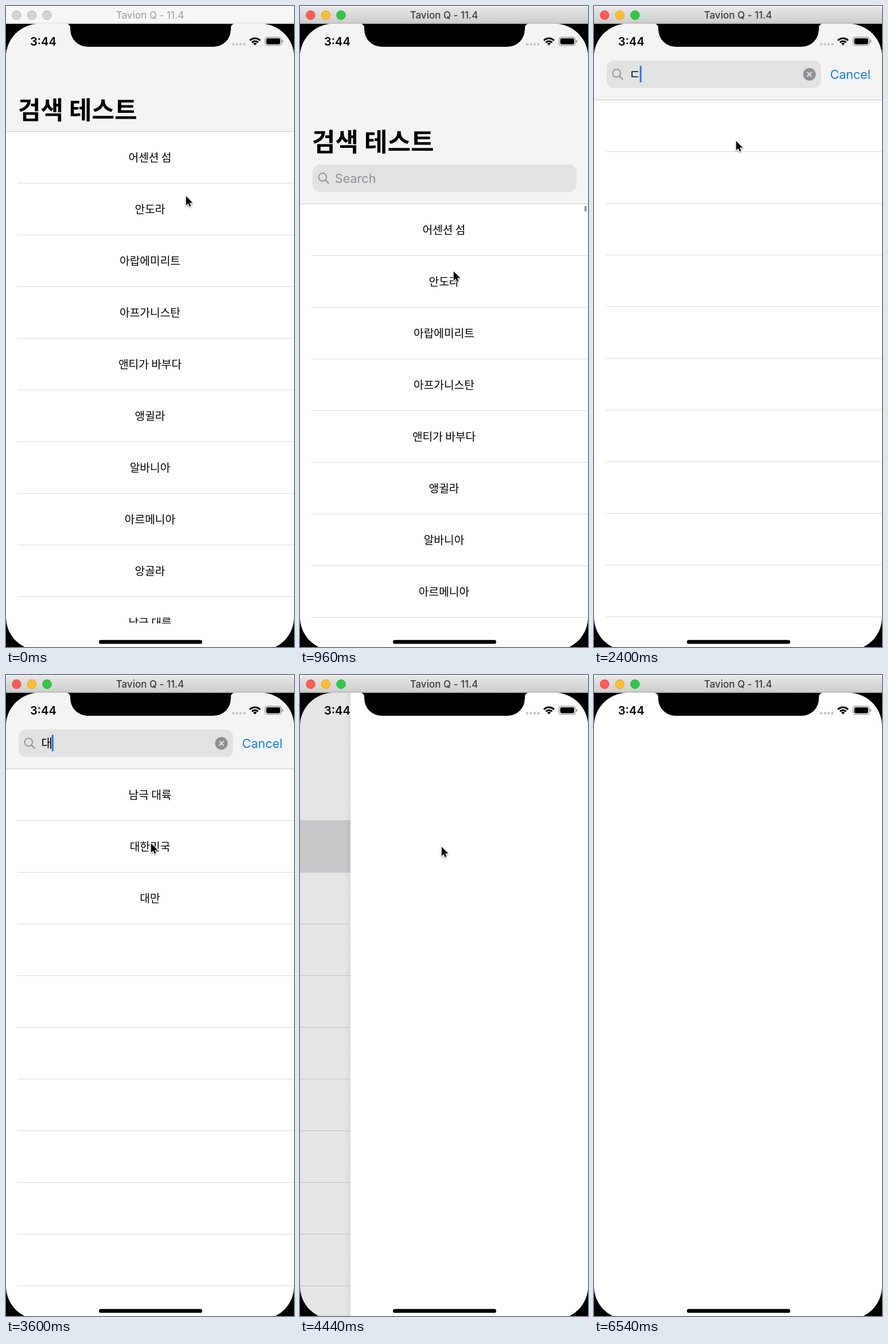
Recreate the animation shown at these times as an HTML page with a canvas. Size 502 by 1116 pixels, loop 7380 ms.

```html
<!DOCTYPE html>
<html lang="ko">
<head>
<meta charset="utf-8">
<title>검색 테스트</title>
<style>
html, body { margin: 0; width: 100%; height: 100%; overflow: hidden; background: #000; }
canvas { display: block; width: 502px; height: 1116px; }
</style>
</head>
<body>
<canvas id="stage" width="502" height="1116"></canvas>
<script>
const W = 502, H = 1116, LOOP = 7380, STEP = 60, ROW = 90;
const CLOSED = 219, OPEN = 289, PULLED = 345, SEARCHING = 164;
const c = document.getElementById('stage').getContext('2d');
const KR = '"Noto Sans CJK KR", "Noto Sans CJK", "Noto Sans CJK JP", sans-serif';
const LATIN = 'Inter, "Open Sans", sans-serif';
const GREY = '#8e8e93', BLUE = '#147bf0';

const countries = ['어센션 섬', '안도라', '아랍에미리트', '아프가니스탄', '앤티가 바부다',
  '앵귈라', '알바니아', '아르메니아', '앙골라', '남극 대륙'];
const matches = ['남극 대륙', '대한민국', '대만'];

// Pointer moves: start, end, x, y
const moves = [
  [240, 660, 267, 461], [1020, 1560, 247, 234],
  [3300, 3600, 252, 292], [3660, 4020, 246, 298],
  [5040, 5340, 128, 240], [5340, 5520, 410, 110], [5520, 5700, 141, 222],
  [6000, 6300, 303, 586], [6420, 6480, 303, 652]
];

const clamp = (v, lo = 0, hi = 1) => Math.min(hi, Math.max(lo, v));
const mix = (a, b, p) => a + (b - a) * p;

function ease(t, from, to) {
  const p = clamp((t - from) / (to - from));
  return p * p * (3 - 2 * p);
}

// Critically damped spring from 0 to 1
function spring(t, start, speed) {
  const s = Math.max(0, t - start) * speed;
  return 1 - (1 + s) * Math.exp(-s);
}

function listTop(t) {
  if (t < 1000) return mix(CLOSED, PULLED, ease(t, 300, 660));
  if (t < 1740) return mix(PULLED, OPEN, spring(t, 990, 0.014));
  return mix(OPEN, SEARCHING, ease(t, 1810, 2130));
}

function caretAlpha(t) {
  if (t < 2940) return ease(t, 2040, 2100);
  return clamp(Math.abs((t - 2940) % 900 - 270) / 180 - 0.5);
}

function pointerAt(t) {
  let x = 313, y = 330;
  for (const [from, to, nx, ny] of moves) {
    const p = ease(t, from, to);
    x = mix(x, nx, p);
    y = mix(y, ny, p);
  }
  return [x, y];
}

function rect(x, y, w, h, color) {
  c.fillStyle = color;
  c.fillRect(x, y, w, h);
}

function pill(x, y, w, h, r, color) {
  c.fillStyle = color;
  c.beginPath();
  c.roundRect(x, y, w, h, r);
  c.fill();
}

function disc(x, y, r, color) {
  c.fillStyle = color;
  c.beginPath();
  c.arc(x, y, r, 0, Math.PI * 2);
  c.fill();
}

function arc(x, y, r, width, color, from = 0, to = 2) {
  c.strokeStyle = color;
  c.lineWidth = width;
  c.beginPath();
  c.arc(x, y, r, from * Math.PI, to * Math.PI);
  c.stroke();
}

function line(x1, y1, x2, y2, width, color) {
  c.strokeStyle = color;
  c.lineWidth = width;
  c.beginPath();
  c.moveTo(x1, y1);
  c.lineTo(x2, y2);
  c.stroke();
}

function text(s, x, y, font, color, align = 'left') {
  c.font = font;
  c.fillStyle = color;
  c.textAlign = align;
  c.fillText(s, x, y);
}

function faded(alpha, draw) {
  if (alpha <= 0) return;
  c.save();
  c.globalAlpha *= clamp(alpha);
  draw();
  c.restore();
}

function titleBar(active) {
  const g = c.createLinearGradient(0, 0, 0, 30);
  g.addColorStop(0, active ? '#e8e8e8' : '#f6f6f6');
  g.addColorStop(1, active ? '#cecece' : '#f6f6f6');
  rect(0, 0, W, 31, '#fff');
  pill(0, 1, W, 30, [6, 6, 0, 0], g);
  rect(0, 29, W, 1, active ? '#b4b4b4' : '#d6d6d6');
  ['#fc5b57', '#fdbd33', '#33c748'].forEach((color, i) => {
    const x = 18.5 + i * 26.5;
    disc(x, 16, 8.2, active ? color : '#d3d3d3');
    arc(x, 16, 7.7, 1, 'rgba(0,0,0,.12)');
  });
  text('Tavion Q - 11.4', 251, 22, '500 17px ' + LATIN, active ? '#3c3c3c' : '#a8a8a8', 'center');
}

function statusBar() {
  text('3:44', 42, 69, '600 20px ' + LATIN, '#050505');
  for (let i = 0; i < 4; i++) disc(396 + i * 6.5, 66.5, 2.2, '#c4c4c6');
  for (let i = 0; i < 3; i++) arc(434, 68.5, 2.3 + i * 5, i ? 3 : 4.6, '#000', 1.24, 1.76);
  c.strokeStyle = '#929292';
  c.lineWidth = 1.3;
  c.beginPath();
  c.roundRect(451.5, 54.3, 28.6, 14.4, 4);
  c.stroke();
  pill(453.6, 56.3, 24.4, 10.4, 2.4, '#000');
  pill(481.3, 59, 2, 5, [0, 2, 2, 0], '#929292');
}

// Screen outline with the notch: corner x, y, radius
function screenPath() {
  const top = 31, bottom = 1122, r = 58;
  c.beginPath();
  c.moveTo(r, top);
  for (const [x, y, radius, nx, ny] of [
    [112, top, 7, 112, 71], [112, 71, 30, 392, 71], [392, 71, 30, 392, top], [392, top, 7, W, top],
    [W, top, r, W, bottom], [W, bottom, r, 0, bottom], [0, bottom, r, 0, top], [0, top, r, r, top]
  ]) c.arcTo(x, y, nx, ny, radius);
  c.closePath();
}

function list(top, rows, picked) {
  c.save();
  c.beginPath();
  c.rect(0, 0, W, 1075);
  c.clip();
  if (picked) rect(0, top + ROW - 1, W, ROW + 1, '#dfdfe1');
  for (let i = 0, y = top; y < 1080; i++, y += ROW) {
    if (rows[i]) text(rows[i], 251, y + 52, '19.2px ' + KR, '#000', 'center');
    rect(20, Math.round(y + ROW - 1), W - 20, 1, '#dadadb');
  }
  c.restore();
}

function searchField(y, h, right, color, query, caret) {
  pill(22, y, right - 22, h, Math.min(13, h / 2), color);
  faded(h / 24 - 1, () => {
    const m = y + h / 2, font = '21px ' + KR;
    arc(39.3, m - 2, 6.8, 1.7, GREY);
    line(44.2, m + 3, 50.3, m + 9, 2, GREY);
    if (query) {
      const x = right - 20.5, d = 4;
      text(query, 61.5, m + 7, font, '#000');
      disc(x, m, 11, GREY);
      line(x - d, m - d, x + d, m + d, 2, color);
      line(x - d, m + d, x + d, m - d, 2, color);
    } else {
      text('Search', 61, m + 7.7, '21.5px ' + LATIN, GREY);
    }
    c.font = font;
    const cx = 60.5 + c.measureText(query).width;
    faded(caret, () => pill(cx, m - 15, 3, 29, 1, '#2b74e8'));
  });
}

function navBar(t, top, query) {
  const open = clamp((OPEN - top) / (OPEN - SEARCHING)) * (t >= 1740);
  const over = Math.max(0, top - OPEN);
  rect(0, 30, W, top - 30, '#f4f4f5');
  rect(0, Math.round(top) - 1, W, 1, '#cbcbcc');
  faded(1 - open * 2, () => {
    const size = 43 * (1 + over * 0.00043);
    text('검색 테스트', 21, 197 + top - Math.max(top, OPEN) * (open > 0) + over * (open > 0)
      - top * (open === 0) + over * (open === 0), `bold ${size}px ${KR}`, '#000');
  });
  const h = open ? 48 : clamp(top - 241, 0, 48);
  if (h > 0) {
    const y = open ? top - 69 : 220 + over;
    const color = t >= 1740 && t < 1920 ? '#c9cacc' : '#e2e2e3';
    searchField(y, h, mix(482, 396, open), color, query, caretAlpha(t));
  }
  faded(open * 2 - 1, () =>
    text('Cancel', mix(500, 411.5, open), top - 37.5, '21.5px ' + LATIN, BLUE));
}

function searchScreen(t, push) {
  const top = listTop(t);
  const query = t < 2400 ? '' : t < 2640 ? 'ㄷ' : '대';
  const rows = !query ? countries : query === '대' ? matches : [];
  rect(0, 30, W + 160, H, '#fff');
  list(top, rows, t >= 4260);
  faded(1 - push * 1.25, () => navBar(t, top, query));
  const bar = ease(t, 360, 480) * (1 - ease(t, 1320, 1560));
  faded(bar, () => pill(496, top + 3, 3.5, Math.max(10, 48 - Math.max(0, top - OPEN)), 1.7, '#929292'));
}

function pointer(x, y) {
  const shape = [[0, 0], [0, 16.2], [3.7, 12.7], [6.1, 18.2], [8.6, 17.1], [6.3, 11.8], [11.4, 11.6]];
  c.save();
  c.translate(x + 0.8, y + 1);
  c.beginPath();
  shape.forEach(([px, py]) => c.lineTo(px, py));
  c.closePath();
  c.lineJoin = 'round';
  c.shadowColor = 'rgba(0,0,0,.4)';
  c.shadowBlur = 3;
  c.shadowOffsetY = 1.5;
  c.strokeStyle = '#fff';
  c.lineWidth = 2;
  c.stroke();
  c.shadowColor = 'transparent';
  c.fillStyle = '#000';
  c.fill();
  c.restore();
}

function blankScreen(edge, push) {
  const g = c.createLinearGradient(edge - 9, 0, edge, 0);
  g.addColorStop(0, 'rgba(0,0,0,0)');
  g.addColorStop(1, 'rgba(0,0,0,.05)');
  rect(0, 30, edge, H, `rgba(0,8,6,${0.103 * clamp(push * 1.3)})`);
  rect(edge - 9, 30, 9, H, g);
  rect(edge, 30, W, H, '#fff');
}

function draw(t) {
  const push = t >= 4800 ? 1 : spring(t, 4260, 0.0176);
  rect(0, 0, W, H, '#000');
  titleBar(t >= 240);
  c.save();
  screenPath();
  c.clip();
  if (push < 1) {
    c.save();
    c.translate(-150 * push, 0);
    searchScreen(t, push);
    c.restore();
  }
  if (push > 0) blankScreen(Math.round(W * (1 - push)), push);
  statusBar();
  pill(162, 1103.8, 180, 6.8, 3.4, '#000');
  c.restore();
  if (t < 6540) pointer(...pointerAt(t));
}

function tick() {
  const t = performance.now() % LOOP;
  draw(Math.floor(t / STEP) * STEP);
  requestAnimationFrame(tick);
}
tick();
</script>
</body>
</html>
```
